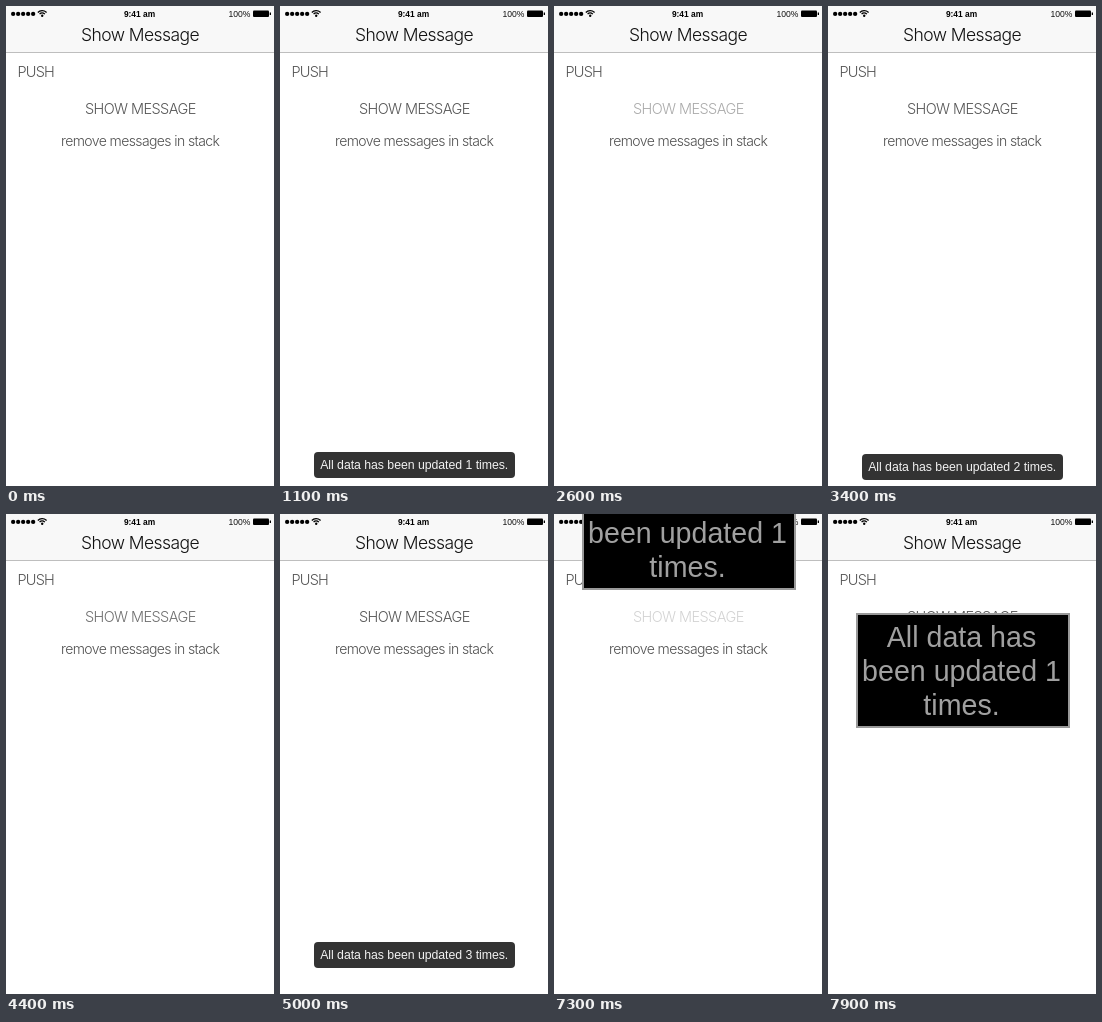
Animation, 268 px wide and 480 px high, one loop 8 s. Source, as an HTML page with a canvas:

```html
<!DOCTYPE html>
<html lang="en">
<head>
<meta charset="utf-8">
<title>Show Message</title>
<style>
  html, body { margin: 0; width: 100%; height: 100%; overflow: hidden; background: #fff; }
  canvas { display: block; width: 268px; height: 480px; }
</style>
</head>
<body>
<canvas id="stage" width="268" height="480"></canvas>
<script>
const ctx = document.getElementById('stage').getContext('2d');
const LOOP = 8000, STEP = 100;
const SANS = '"Liberation Sans", Arial, sans-serif';
const LIGHT = 'Inter, "Liberation Sans", sans-serif';
const IDLE = 0x55, DIM = 0xd4;

// press: finger down, ramp: time to dim, show: release and toast entry
const toasts = [
  { press: 600, ramp: 0, show: 800 },
  { press: 2200, ramp: 600, show: 2800 },
  { press: 4300, ramp: 500, show: 4800 }
];
const HOLD = 700, LIFE = 1100, RELEASE = 200;
const ALERT = 7249;

const clamp = v => Math.max(0, Math.min(1, v));

// Damped swing around zero, starting far on the positive side.
const spring = t => -Math.exp(-0.0086 * t) * Math.sin(0.01428 * (t - 100));

function rect(x, y, w, h, color) {
  ctx.fillStyle = color;
  ctx.fillRect(x, y, w, h);
}

function round(x, y, w, h, r, color) {
  ctx.fillStyle = color;
  ctx.beginPath();
  ctx.roundRect(x, y, w, h, r);
  ctx.fill();
}

function text(str, x, y, size, color, { align = 'left', weight = 400, gap = 0, font = SANS } = {}) {
  ctx.font = `${weight} ${size}px ${font}`;
  ctx.letterSpacing = gap + 'px';
  ctx.textAlign = align;
  ctx.fillStyle = color;
  ctx.fillText(str, x, y);
}

function thin(str, x, y, size, color, gap, align = 'center') {
  text(str, x, y, size, color, { align, gap, weight: 300, font: LIGHT });
}

function statusBar() {
  for (let i = 0; i < 5; i++) round(5 + i * 5, 5.8, 4.3, 4.3, 2.15, '#000');
  ctx.strokeStyle = '#000';
  ctx.lineWidth = 1.3;
  for (const r of [3.6, 6]) {
    ctx.beginPath();
    ctx.arc(36.2, 10.6, r, -Math.PI * 0.76, -Math.PI * 0.24);
    ctx.stroke();
  }
  round(35, 8.6, 2.4, 2.4, 1.2, '#000');
  text('9:41 am', 133.5, 11, 8.4, '#000', { align: 'center', weight: 700 });
  text('100%', 222.5, 11, 8.6, '#111');
  round(247, 4.5, 16, 6.5, 1, '#000');
  rect(263.7, 6.5, 1.3, 2.5, '#000');
}

function buttonShade(t) {
  let dim = 0;
  for (const { press, ramp, show } of toasts) {
    if (t < press) continue;
    dim = t < show
      ? (ramp ? clamp((t - press) / ramp) : 1)
      : 1 - clamp((t - show) / RELEASE);
  }
  if (t >= ALERT) dim = 1 - clamp((t - ALERT - 50) / RELEASE);
  const v = Math.round(IDLE + (DIM - IDLE) * dim);
  return `rgb(${v},${v},${v})`;
}

function page(t) {
  rect(0, 0, 268, 480, '#fff');
  rect(0, 0, 268, 46, '#f8f8f8');
  rect(0, 46, 268, 1, '#bebebe');
  statusBar();
  thin('Show Message', 134, 35, 17.5, '#111', -0.57);
  thin('PUSH', 11.5, 71, 14.5, '#555', -0.8, 'left');
  thin('SHOW MESSAGE', 134.3, 108, 14.5, buttonShade(t), -0.58);
  thin('remove messages in stack', 134.2, 140, 14, '#505050', -0.6);
}

function toast(age, count) {
  if (age < 0 || age >= LIFE) return;
  const y = Math.round(449 + 118 * spring(age));
  ctx.globalAlpha = 1 - clamp((age - HOLD) / (LIFE - HOLD));
  round(34, y, 201, 26, 4, '#333');
  text(`All data has been updated ${count} times.`, 134.2, y + 17, 12.3, '#f2f2f2',
    { align: 'center', gap: -0.04 });
  ctx.globalAlpha = 1;
}

function alertBox(age) {
  if (age < 0) return;
  const y = Math.round(98 - 330 * spring(age));
  rect(28, y, 214, 115, '#999');
  rect(30, y + 2, 210, 111, '#000');
  ['All data has', 'been updated 1', 'times.'].forEach((line, i) =>
    text(line, 133.5, y + 34 + i * 34, 28.6, '#a0a0a0', { align: 'center' }));
}

const start = performance.now();

function draw() {
  const t = Math.floor(((performance.now() - start) % LOOP) / STEP) * STEP;
  page(t);
  toasts.forEach(({ show }, i) => toast(t - show, i + 1));
  alertBox(t - ALERT);
  requestAnimationFrame(draw);
}
draw();
</script>
</body>
</html>
```
